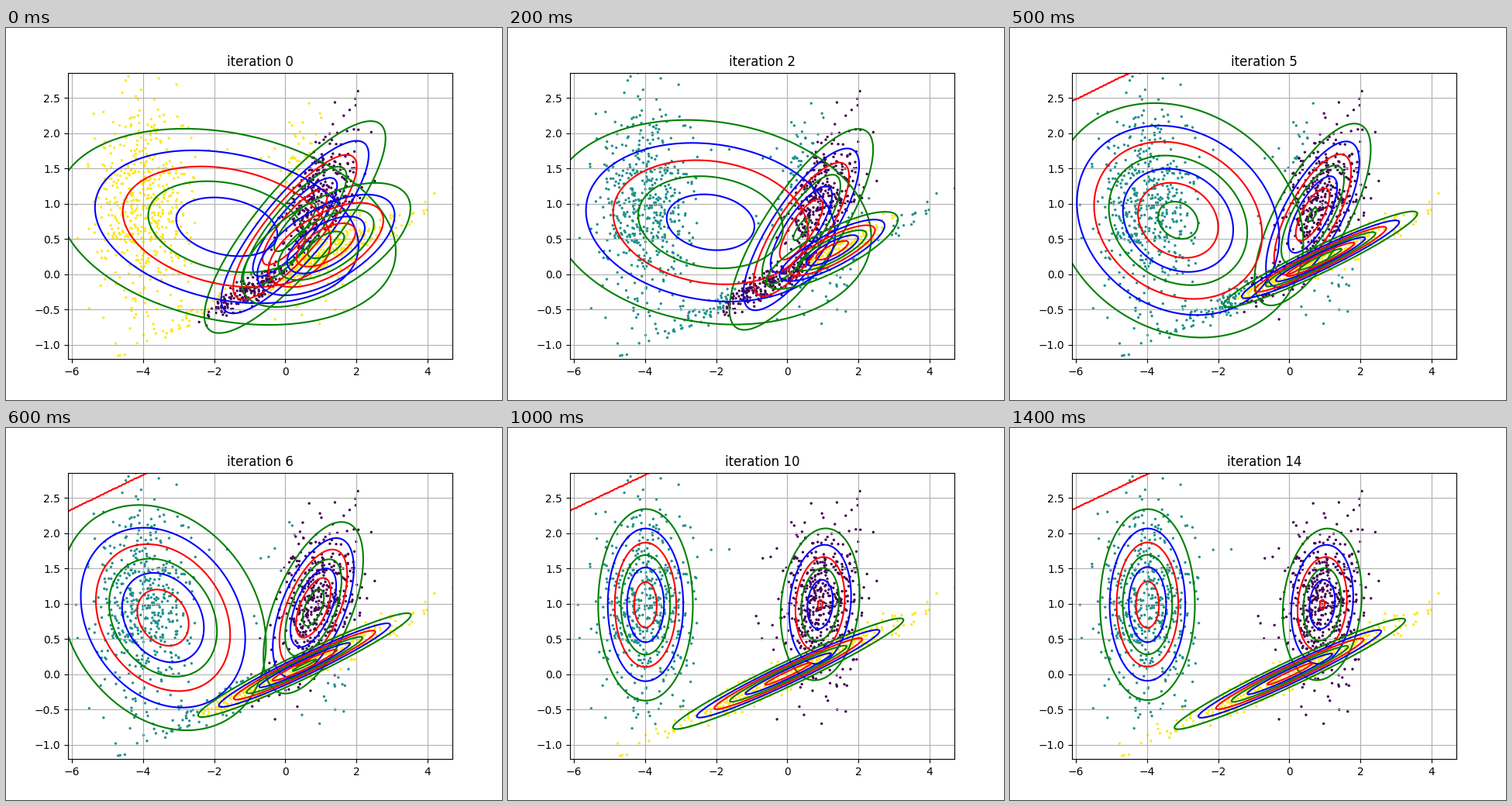
A matplotlib script for the animation above (1500 ms loop, 640 by 480 pixels).

```python
import numpy as np
import matplotlib.pyplot as plt
from matplotlib.animation import FuncAnimation

STEPS = 15
XLIM, YLIM = (-6.113, 4.698), (-1.2027, 2.8613)


def gaussian(mx, my, sx, sy, rho):
    """Mean and covariance from spreads and correlation."""
    cov = rho * sx * sy
    return np.array([mx, my]), np.array([[sx * sx, cov], [cov, sy * sy]])


def density(x, y, mean, cov):
    sx = np.sqrt(cov[0, 0])
    slope = cov[0, 1] / cov[0, 0]
    sy = np.sqrt(cov[1, 1] - slope * cov[0, 1])
    dx, dy = x - mean[0], y - mean[1]
    u, v = dx / sx, (dy - slope * dx) / sy
    return np.exp(-(u * u + v * v) / 2) / (2 * np.pi * sx * sy)


def sample(rng, mean, cov, count=500):
    """Random points whose own mean and covariance are exactly those given."""
    z = rng.standard_normal((count, 2))
    z -= z.mean(axis=0)
    z = z @ np.linalg.inv(np.linalg.cholesky(np.cov(z.T, bias=True))).T
    return mean + z @ np.linalg.cholesky(cov).T


def scores(model):
    return np.array([w * density(px, py, mean, cov) for w, mean, cov in model])


def em_step(model):
    shares = scores(model)
    shares /= shares.sum(axis=0)
    return [(share.mean(),
             np.average(points, axis=0, weights=share),
             np.cov(points.T, aweights=share, ddof=0))
            for share in shares]


rng = np.random.default_rng(4)
points = np.vstack([
    sample(rng, *gaussian(0.93, 1.0, 0.585, 0.562, 0.12)),
    sample(rng, *gaussian(-3.99, 1.0, 0.683, 0.681, 0)),
    sample(rng, *gaussian(-0.01, 0.0, 1.70, 0.41, 0.971))])
px, py = points.T

models = [[(0.275, *gaussian(0.27, 0.67, 1.257, 0.742, 0.837)),
           (0.690, *gaussian(-1.648, 0.674, 2.528, 0.74, -0.25)),
           (0.035, *gaussian(1.142, 0.417, 1.176, 0.4354, 0.59))]]
while len(models) < STEPS:
    models.append(em_step(models[-1]))

gx, gy = np.meshgrid(np.linspace(*XLIM, 300), np.linspace(*YLIM, 300))
fig, ax = plt.subplots(figsize=(6.4, 4.8), dpi=100)


def draw(k):
    ax.clear()
    # Points keep the labels of the step before the contours.
    labels = np.argmax(scores(models[max(k - 1, 0)]), axis=0)
    ax.scatter(px, py, s=2, c=labels, cmap="viridis")
    for _, mean, cov in models[k]:
        ax.contour(gx, gy, density(gx, gy, mean, cov), colors=("r", "g", "b"))
    ax.grid(True)
    ax.set_xlim(XLIM)
    ax.set_ylim(YLIM)
    ax.set_title(f"iteration {k}")
    return []


anim = FuncAnimation(fig, draw, frames=STEPS, init_func=lambda: [],
                     interval=100, repeat=True, repeat_delay=0)
plt.show()
```
